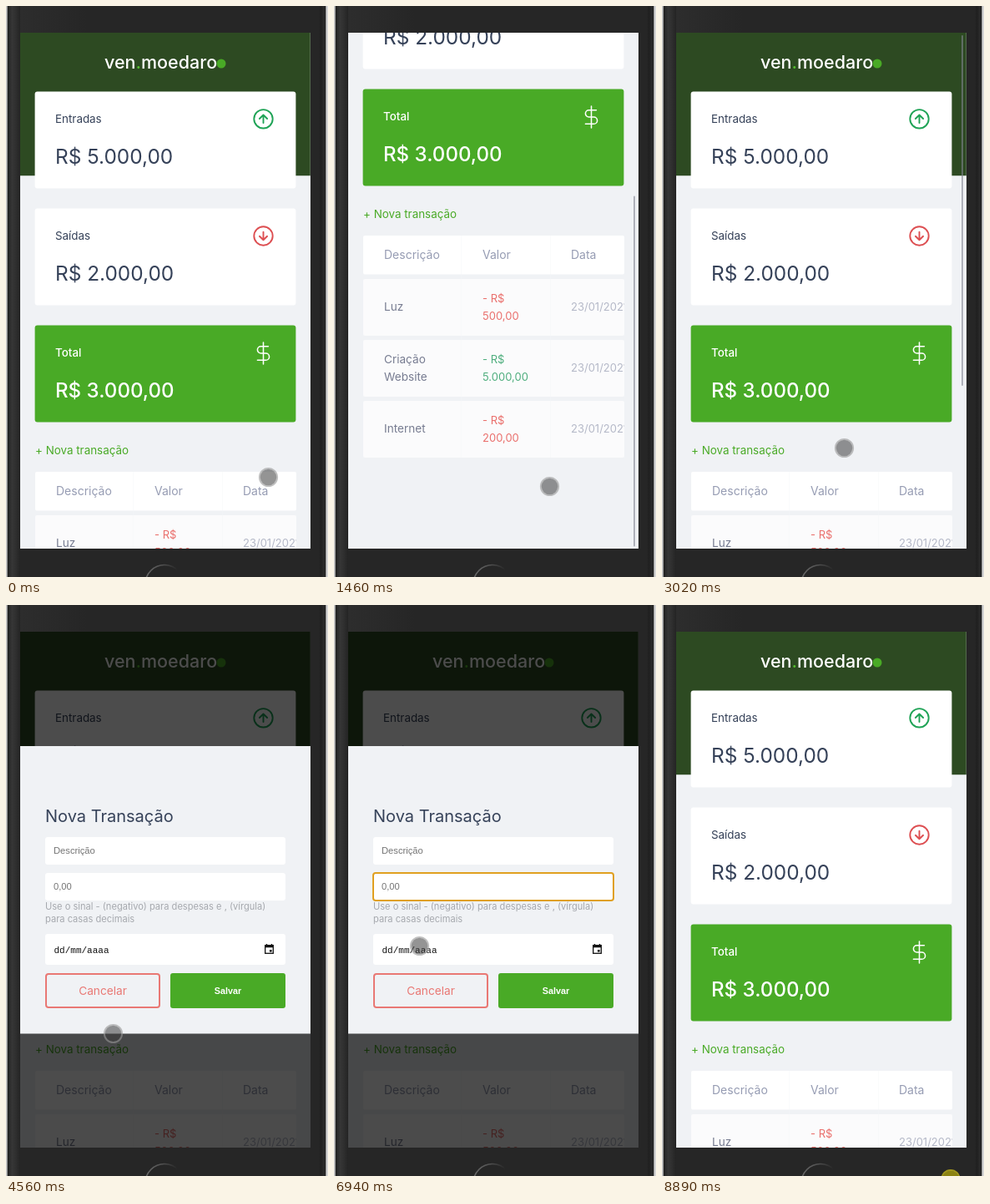
These frames come from a looping animation (386x684 px, 8970 ms). An HTML page with a canvas:

```html
<!DOCTYPE html>
<html lang="pt-BR">
<head>
<meta charset="utf-8">
<title>Finanças</title>
<style>
html, body { margin: 0; width: 100%; height: 100%; overflow: hidden; background: #262626; }
canvas { display: block; width: 386px; height: 684px; }
</style>
</head>
<body>
<canvas id="stage"></canvas>
<script>
const W = 386, H = 684, LOOP = 8970;
const SANS = 'Inter, "Open Sans", sans-serif';
const ARIAL = '"Liberation Sans", Arial, sans-serif';
const MONO = '"Liberation Mono", monospace';
const GREEN = '#49aa26', PAGE = '#f0f2f5', INK = '#364259';
const MUTED = '#969cb3', CELL = '#777c91', DATE = '#b5b9c8';
const RED = '#ea706d', INCOME = '#4fae7e';
const SCREEN = { x: 17, y: 32, w: 348, h: 618 };

const canvas = document.getElementById('stage');
const c = canvas.getContext('2d');
const dpr = window.devicePixelRatio || 1;
canvas.width = W * dpr;
canvas.height = H * dpr;

// Keyframes: [time, value, value...], eased between neighbours.
const pointerPath = [
  [0, 314, 564], [380, 273, 105], [640, 273, 105], [930, 301, 153],
  [1460, 258, 575], [1590, 258, 575], [2010, 244, 667], [2260, 244, 667],
  [2330, 237, 619], [3020, 218, 529], [3180, 214, 534], [3250, 214, 534],
  [3600, 150, 548], [4010, 118, 532], [4490, 118, 532], [4560, 128, 513],
  [5410, 288, 295], [5560, 288, 295], [5950, 190, 527], [6410, 69, 343],
  [6440, 69, 343], [6710, 114, 401], [6870, 114, 401], [6940, 102, 408],
  [7330, 116, 461], [7900, 116, 461], [8420, 340, 705], [LOOP, 340, 705]
];
const barFade = [[0, 0], [640, 0], [760, 1], [3240, 1], [3560, 0], [LOOP, 0]];
const modalFade = [[0, 0], [4120, 0], [4330, 1], [7900, 1], [8120, 0], [LOOP, 0]];

const clamp = v => Math.max(0, Math.min(1, v));
const progress = (t, from, to) => clamp((t - from) / (to - from));
const smooth = u => u * u * (3 - 2 * u);
const easeOut = u => 1 - (1 - u) * (1 - u);

function follow(keys, t) {
  let i = 1;
  while (i < keys.length - 1 && keys[i][0] < t) i++;
  const a = keys[i - 1], b = keys[i];
  const u = smooth(progress(t, a[0], b[0]));
  return a.slice(1).map((v, k) => v + (b[k + 1] - v) * u);
}

// Whole pixels keep edges and text crisp while scrolling.
function scrollAt(t) {
  return Math.round(283 * easeOut(progress(t, 671, 1460))
    - 92 * smooth(progress(t, 1590, 2010))
    - 191 * easeOut(progress(t, 2330, 2960)));
}

function box(x, y, w, h, fill, r = 0) {
  c.fillStyle = fill;
  c.beginPath();
  c.roundRect(x, y, w, h, r);
  c.fill();
}

function frame(x, y, w, h, color, width) {
  c.strokeStyle = color;
  c.lineWidth = width;
  c.beginPath();
  c.roundRect(x, y, w, h, 3);
  c.stroke();
}

function text(str, x, y, size, color, { weight = 400, font = SANS, align = 'left' } = {}) {
  c.font = `${weight} ${size}px ${font}`;
  c.textAlign = align;
  c.fillStyle = color;
  c.fillText(str, x, y);
  return c.measureText(str).width;
}

function disc(x, y, r, fill) {
  c.fillStyle = fill;
  c.beginPath();
  c.arc(x, y, r, 0, Math.PI * 2);
  c.fill();
}

function arrowIcon(x, y, dir, color) {
  c.strokeStyle = color;
  c.lineWidth = 1.9;
  c.lineCap = c.lineJoin = 'round';
  c.beginPath();
  c.arc(x, y, 11.2, 0, Math.PI * 2);
  c.moveTo(x, y - 4.8 * dir);
  c.lineTo(x, y + 4.8 * dir);
  c.moveTo(x - 4.6, y + 0.3 * dir);
  c.lineTo(x, y + 4.8 * dir);
  c.lineTo(x + 4.6, y + 0.3 * dir);
  c.stroke();
}

const dollar = new Path2D('M12 1V23M17 5H9.5a3.5 3.5 0 0 0 0 7h5a3.5 3.5 0 0 1 0 7H6');
function dollarIcon(x, y) {
  c.save();
  c.translate(x, y);
  c.scale(1.18, 1.18);
  c.translate(-12, -12);
  c.strokeStyle = '#fff';
  c.lineWidth = 1.3;
  c.lineCap = c.lineJoin = 'round';
  c.stroke(dollar);
  c.restore();
}

function card(y, label, amount, fill, ink, weight = 400) {
  box(34.6, y, 312.8, 115.8, fill, 3);
  text(label, 59, y + 37.4, 13.4, ink, { weight });
  text(amount, 59, y + 86.4, weight > 400 ? 24.1 : 24.4, ink, { weight });
}

function logo() {
  const opt = { weight: 500 };
  let x = 118;
  x += text('ven', x, 75, 21.5, '#fff', opt);
  x += text('.', x, 75, 21.5, '#55c02f', opt);
  text('moedaro', x, 75, 21.5, '#fff', opt);
  disc(258, 69, 5.5, GREEN);
}

function row(y, name, value, color) {
  const mid = y + 38;
  box(35, y, 313, 68, '#fbfbfc', 2);
  const top = name.length > 1 ? mid - 10 : mid;
  name.forEach((s, i) => text(s, 60, top + 21 * i, 13.6, CELL));
  text('- R$', 178, mid - 10, 13, color);
  text(value, 178, mid + 11, 13, color);
  text('23/01/2021', 284, mid, 13, DATE);
}

function table() {
  c.save();
  c.beginPath();
  c.rect(35, 550, 313, 290);
  c.clip();
  box(35, 558, 313, 46.6, '#fff', 2);
  text('Descrição', 60, 586, 14, MUTED);
  text('Valor', 178, 586, 14, MUTED);
  text('Data', 284, 586, 14, MUTED);
  row(610, ['Luz'], '500,00', RED);
  row(683, ['Criação', 'Website'], '5.000,00', INCOME);
  row(756, ['Internet'], '200,00', RED);
  for (const x of [152, 259]) box(x, 558, 1, 266, 'rgba(240,242,245,.35)');
  c.restore();
}

function page(scroll) {
  box(SCREEN.x, SCREEN.y, SCREEN.w, SCREEN.h, PAGE);
  c.save();
  c.translate(0, -scroll);
  box(17, 32, 347.8, 171.2, '#2d4a22');
  logo();
  card(102.6, 'Entradas', 'R$ 5.000,00', '#fff', INK);
  arrowIcon(308.5, 135.3, -1, '#1fa356');
  card(242.6, 'Saídas', 'R$ 2.000,00', '#fff', INK);
  arrowIcon(308.5, 275.5, 1, '#dd4f52');
  card(382.6, 'Total', 'R$ 3.000,00', GREEN, '#fff', 500);
  dollarIcon(308.5, 416);
  text('+ Nova transação', 35, 537, 13.4, GREEN);
  table();
  c.restore();
}

function scrollbar(scroll, alpha) {
  if (alpha > 0) box(359, 35 + scroll * 0.68, 2, 420, `rgba(130,134,146,${alpha * 0.6})`, 1);
}

function calendar(x, y) {
  c.strokeStyle = '#111';
  c.lineWidth = 1.3;
  c.strokeRect(x + 0.7, y + 1.7, 9.6, 9.6);
  box(x + 0.5, y + 1.5, 10, 2.8, '#111');
  box(x + 1.8, y, 1.4, 2, '#111');
  box(x + 7.8, y, 1.4, 2, '#111');
  box(x + 6, y + 7, 2.6, 2.6, '#111');
}

function modal(t, alpha) {
  if (alpha <= 0) return;
  c.save();
  c.globalAlpha = alpha;
  box(SCREEN.x, SCREEN.y, SCREEN.w, SCREEN.h, 'rgba(0,0,0,.7)');
  box(17, 169, 348, 344.5, PAGE);
  text('Nova Transação', 47, 260, 20, INK);
  for (const [y, h] of [[278, 33], [321, 33], [394, 37]]) box(47, y, 288, h, '#fff', 3);
  text('Descrição', 57, 298, 11.2, '#757575', { font: ARIAL });
  text('0,00', 57, 341, 11.2, '#757575', { font: ARIAL });
  const hint = '#a6a9ae';
  text('Use o sinal - (negativo) para despesas e , (vírgula)', 47, 365, 11.1, hint);
  text('para casas decimais', 47, 380, 11.1, hint);
  text('dd/mm/aaaa', 57.5, 417, 11, '#111', { font: MONO });
  calendar(310, 406);
  frame(48, 442, 136, 40, '#e97874', 2);
  text('Cancelar', 116, 467, 13.7, '#e97874', { align: 'center' });
  box(197, 441, 138, 42, GREEN, 3);
  text('Salvar', 266, 466, 10.8, '#fff', { weight: 700, font: ARIAL, align: 'center' });
  if (t >= 5590 && t < 6390) frame(47, 278, 288, 33, '#e0a020', 2);
  if (t >= 6390 && t < 7300) frame(47, 321, 288, 33, '#e0a020', 2);
  c.restore();
}

function gradient(x0, x1, stops) {
  const g = c.createLinearGradient(x0, 0, x1, 0);
  stops.forEach(([p, color]) => g.addColorStop(p, color));
  return g;
}

function phone() {
  box(0, 0, W, H, '#262626');
  box(17, 0, 80, 32, gradient(17, 97, [[0, '#2d2d2d'], [1, '#262626']]));
  box(0, 0, 17, H, gradient(2, 17, [
    [0, '#1c1c1c'], [0.14, '#2b2b2b'], [0.35, '#363636'], [0.65, '#2f2f2f'], [1, '#242424']
  ]));
  box(0, 0, 1.7, H, '#c4c4c4');
  box(365, 0, 19, H, gradient(365, 383, [
    [0, '#262626'], [0.55, '#262626'], [0.7, '#202020'], [0.9, '#2a2a2a'], [1, '#1c1c1c']
  ]));
  box(383.4, 0, 2.6, H, '#d4d4d4');
  c.strokeStyle = gradient(166, 210, [[0, '#6a6a6a'], [0.5, '#505050'], [0.9, '#262626']]);
  c.lineWidth = 1.6;
  c.beginPath();
  c.arc(190, 692.5, 23, Math.PI, 0);
  c.stroke();
}

function pointer(x, y, fill, ring) {
  disc(x + 0.5, y + 0.5, 9.8, fill);
  c.strokeStyle = ring;
  c.lineWidth = 2;
  c.beginPath();
  c.arc(x + 0.5, y + 0.5, 10.6, 0, Math.PI * 2);
  c.stroke();
}

function draw(t) {
  const scroll = scrollAt(t);
  c.setTransform(dpr, 0, 0, dpr, 0, 0);
  phone();
  c.save();
  c.beginPath();
  c.rect(SCREEN.x, SCREEN.y, SCREEN.w, SCREEN.h);
  c.clip();
  page(scroll);
  scrollbar(scroll, follow(barFade, t)[0]);
  modal(t, follow(modalFade, t)[0]);
  c.restore();
  if (t >= 8885) {
    pointer(345.5, 687, '#8b8212', '#a1961c');
  } else {
    const [x, y] = follow(pointerPath, t);
    pointer(x, y, 'rgba(60,60,60,.55)', 'rgba(150,150,150,.6)');
  }
}

const start = performance.now();
function tick() {
  draw((performance.now() - start) % LOOP);
  requestAnimationFrame(tick);
}
tick();
</script>
</body>
</html>
```
